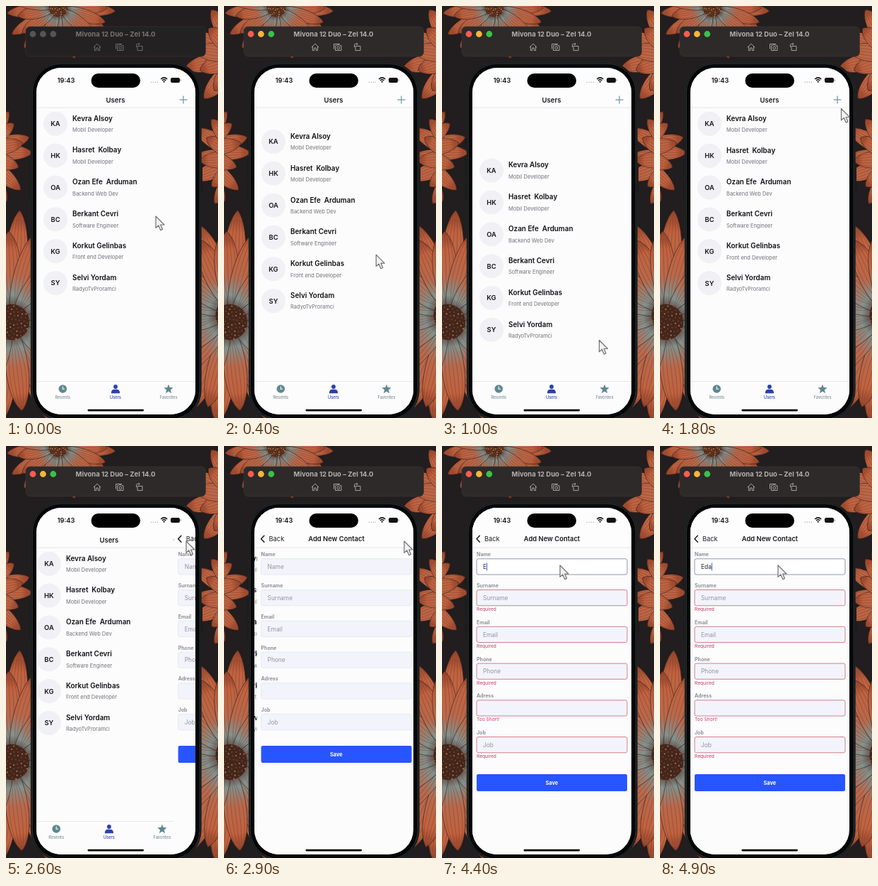
An HTML page that plays this animation: 300 px wide and 580 px high, repeating every 5 s.

```html
<!DOCTYPE html>
<html lang="en">
<head>
<meta charset="utf-8">
<title>Contacts app</title>
<style>
html, body { margin: 0; width: 100%; height: 100%; overflow: hidden; background: #211c1d; }
svg { display: block; width: 300px; height: 580px; }
text { font-family: Inter, Roboto, sans-serif; white-space: pre; }
</style>
</head>
<body>
<svg id="stage" viewBox="0 0 300 580" xmlns="http://www.w3.org/2000/svg"></svg>
<script>
const LOOP = 5000, STEP = 100;
const SCREEN = { x: 43, y: 87, w: 225, h: 488 };
const $ = id => document.getElementById(id);

const text = (x, y, size, str, fill, weight = 400, anchor = "start") =>
  `<text x="${x}" y="${y}" font-size="${size}" font-weight="${weight}" fill="${fill}" text-anchor="${anchor}">${str}</text>`;
const rect = (x, y, w, h, r, fill, extra = "") =>
  `<rect x="${x}" y="${y}" width="${w}" height="${h}" rx="${r}" fill="${fill}" ${extra}/>`;
const circle = (x, y, r, fill, extra = "") =>
  `<circle cx="${x}" cy="${y}" r="${r}" fill="${fill}" ${extra}/>`;
const path = (d, extra) => `<path d="${d}" ${extra}/>`;

// ---- wallpaper ----
function seeded(seed) {
  return () => (seed = (seed * 16807) % 2147483647) / 2147483647;
}

function petal(x, y, angle, len, w) {
  let veins = "";
  for (let k = -.6; k < .7; k += .3)
    veins += `M${len * .15} 0Q${len * .5} ${k * w * 1.5} ${len * .92} ${k * w * .5}`;
  const shape = `M0 0C${len * .25} ${-w} ${len * .85} ${-w} ${len} 0C${len * .85} ${w} ${len * .25} ${w} 0 0Z`;
  return `<g transform="translate(${x} ${y}) rotate(${angle})">` +
    path(shape, 'fill="url(#petal)" stroke="#3d211c" stroke-width=".9" stroke-opacity=".7"') +
    path(veins, 'fill="none" stroke="#6b3022" stroke-width="1" opacity=".35"') + "</g>";
}

// Two rings of petals around a speckled disc
function flower(x, y, radius, count, seed) {
  const random = seeded(seed);
  let out = "";
  for (const ring of [1, .85])
    for (let i = 0; i < count; i++) {
      const angle = (i + ring * 3 + random() * .5) * 360 / count;
      out += petal(x, y, angle, radius * ring * (.88 + random() * .2), radius * 2.3 / count);
    }
  const core = radius * .17;
  out += circle(x, y, core, "#43261c");
  for (let i = 1; i < 70; i++) {
    const a = i * 2.4, d = core * Math.sqrt(i / 70);
    out += circle((x + d * Math.cos(a)).toFixed(1), (y + d * Math.sin(a)).toFixed(1), 1.1, i % 3 ? "#70402a" : "#b8703f");
  }
  return out;
}

const wallpaper = () => rect(0, 0, 300, 580, 0, "#221d1e") +
  flower(-42, 205, 82, 13, 5) + flower(334, 70, 80, 11, 8) + flower(338, 215, 80, 12, 3) +
  flower(74, 2, 78, 15, 11) + flower(322, 435, 150, 16, 21) + flower(8, 445, 148, 16, 14);

// ---- simulator window and phone body ----
function windowBar() {
  const line = 'fill="none" stroke="currentColor" stroke-width=".9" stroke-linejoin="round"';
  return rect(28, 29, 254.5, 42, 6, "#2b2827", 'id="bar" stroke="#3b3735" stroke-width=".6"') +
    lights.map((c, i) => circle(38 + i * 14.4, 39.5, 4.4, c, `id="light${i}"`)).join("") +
    `<g id="barInk">` + text(155, 42.6, 9.5, "Mivona 12 Duo – Zel 14.0", "currentColor", 700, "middle") +
    path("M123.8 58.2L129 53.2L134.2 58.2M125.4 57V62.6H127.7V59H130.3V62.6H132.6V57", line) +
    path("M155.5 60.5V53.5H164M157.5 55.8H159.3L160.2 54.8H163L163.9 55.8H166V62.5H157.5Z", line) +
    circle(161.7, 59, 1.9, "none", 'stroke="currentColor" stroke-width=".9"') +
    path("M186 56.5H193V62.6H186ZM184.5 58V54.5Q184.5 53.5 185.5 53.5H189M187.6 52L189.2 53.5L187.6 55", line) + "</g>";
}

function phoneBody() {
  const button = (x, y, h) => rect(x, y, 3, h, 1, "#15191a");
  return button(33.4, 186, 14) + button(33.4, 215, 25) + button(33.4, 247, 25) + button(275, 222, 42) +
    rect(35.2, 79.3, 241, 504, 42, "#111415", 'stroke="#24292a"') +
    rect(37.3, 81.3, 236.8, 500, 40, "#050607", 'stroke="#353b3d" stroke-width=".9"');
}

function statusBar() {
  let out = text(85, 108, 9.2, "19:43", "#111", 600, "middle") + rect(120.5, 95, 69.5, 20, 10, "#000");
  for (let i = 0; i < 4; i++) out += circle(205.3 + i * 3, 107.2, .7, "#aaa");
  return out +
    path("M219.2 103Q223.7 98.8 228.2 103M221 105Q223.7 102.5 226.4 105", 'fill="none" stroke="#111" stroke-width="1.5"') +
    path("M222.1 106.3Q223.7 105 225.3 106.3L223.7 108Z", 'fill="#111"') +
    rect(233, 101, 13, 7, 2.2, "#111") + rect(246.6, 103.2, 1, 2.6, .5, "#777");
}

// ---- app pages ----
const people = [
  ["KA", "Kevra Alsoy", "Mobil Developer"],
  ["HK", "Hasret  Kolbay", "Mobil Developer"],
  ["OA", "Ozan Efe  Arduman", "Backend Web Dev"],
  ["BC", "Berkant Cevri", "Software Engineer"],
  ["KG", "Korkut Gelinbas", "Front end Developer"],
  ["SY", "Selvi Yordam", "RadyoTvProramci"]
];

const header = rect(43, 87, 225, 56, 0, "#fdfdfe") + rect(43, 142.7, 225, .7, 0, "#d9dadd");

function starPath(cx, cy, r) {
  let d = "";
  for (let i = 0; i < 10; i++) {
    const a = i * Math.PI / 5 - Math.PI / 2, k = i % 2 ? r * .42 : r;
    d += (i ? "L" : "M") + (cx + k * Math.cos(a)).toFixed(2) + " " + (cy + k * Math.sin(a)).toFixed(2);
  }
  return d + "Z";
}

function listPage() {
  const rows = people.map(([initials, name, job], i) => {
    const y = i * 44.85;
    return circle(70, 165.7 + y, 17, "#f0f0f5") +
      text(70, 169.2 + y, 9.4, initials, "#17171a", 600, "middle") +
      text(94, 161.6 + y, 9.9, name, "#101014", 600) +
      text(94, 177 + y, 7.5, job, "#727278");
  }).join("");
  const teal = "#5f8790", blue = "#2b40ad";
  const tab = (x, label, fill) => text(x, 552.8, 5.7, label, fill, 500, "middle");
  return rect(43, 87, 225, 488, 0, "#fcfcfd") + `<g id="rows">${rows}</g>` + header +
    text(155, 135.6, 9.5, "Users", "#17171a", 600, "middle") +
    path("M251 126.5V137.5M245.5 132H256.5", 'stroke="#83a8ae" stroke-width="1.5"') +
    rect(43, 528, 225, 47, 0, "#fcfcfd") + rect(43, 528, 225, .7, 0, "#dedfe2") +
    circle(80.3, 539, 5.8, teal) + path("M80.3 535.4V539.2H83.2", 'fill="none" stroke="#fff" stroke-width="1.1"') +
    circle(155, 536, 2.9, blue) + path("M149 545.3V543.6Q149.6 539.8 153 539.8H157Q160.4 539.8 161 543.6V545.3Z", `fill="${blue}"`) +
    path(starPath(230, 539.5, 7), `fill="${teal}"`) +
    tab(80.3, "Resents", "#7d8f96") + tab(155, "Users", blue) + tab(230, "Favorites", "#7d8f96");
}

const fields = [
  ["Name"], ["Surname", "Required"], ["Email", "Required"],
  ["Phone", "Required"], ["Adress", "Too Short!"], ["Job", "Required"]
];

function formPage() {
  const rows = fields.map(([label, error], i) =>
    `<g id="field${i}">` + text(49, 155.4, 7.1, label, "#83838d", 600) +
    rect(49, 158.8, 213, 22.2, 2.5, "#f3f4fb", `id="box${i}" stroke="#e3e5ee" stroke-width=".8"`) +
    `<g id="hint${i}">` + (label === "Adress" ? "" : text(58, 173.1, 8.4, label, "#92939e")) + "</g>" +
    (error ? `<g class="error">${text(49, 188.3, 6.6, error, "#c03a62")}</g>` : "") + "</g>").join("");
  return rect(43, 87, 225, 488, 0, "#fcfcfd") + header +
    path("M53.3 126.2L49 130.7L53.3 135.2", 'fill="none" stroke="#17171a" stroke-width="1.5" stroke-linecap="round" stroke-linejoin="round"') +
    text(60, 134.2, 9.3, "Back", "#222226") +
    text(155.5, 134.2, 9.4, "Add New Contact", "#17171a", 600, "middle") + rows +
    `<text id="typed" x="58" y="173.1" font-size="8.4" fill="#222228"></text>` +
    rect(58, 164.3, 1, 11.2, .5, "#3f62e8", 'id="caret"') +
    `<g id="save">` + rect(49, 422, 213, 24, 2.2, "#2755ff") + text(155.3, 436.8, 7.4, "Save", "#fff", 700, "middle") + "</g>";
}

const lights = ["#ff5b50", "#f9b53a", "#38c249"];

$("stage").innerHTML = `<defs>
  <linearGradient id="petal"><stop offset=".1" stop-color="#4d2a22"/><stop offset=".28" stop-color="#82928e"/>
    <stop offset=".5" stop-color="#b8694c"/><stop offset=".8" stop-color="#c06340"/><stop offset="1" stop-color="#8f4029"/></linearGradient>
  <clipPath id="screen">${rect(SCREEN.x, SCREEN.y, SCREEN.w, SCREEN.h, 35, "#fff")}</clipPath></defs>` +
  wallpaper() + phoneBody() + windowBar() +
  `<g clip-path="url(#screen)"><g id="list">${listPage()}</g><g id="form">${formPage()}</g>${statusBar()}` +
  rect(115.5, 567.8, 79.5, 2.6, 1.3, "#000") + "</g>" +
  `<g id="cursor">` + path("M0 0V16.4L3.8 13L6.7 19.6L9.5 18.4L6.7 12H12Z",
    'fill="#f1f1f1" stroke="#707074" stroke-width="1.2" stroke-linejoin="round"') + "</g>";

// ---- motion ----
const GRAB = 100, RELEASE = 940, PUSH = 2565, FOCUS = 3600;
const TYPE = 4400, KEY_GAP = 220, WORD = "Eda";
const home = { x: 212, y: 296 };
const legs = [
  { from: GRAB, to: 910, x: 222.5, y: 470.5 },
  { from: 1100, to: 1750, x: 256.5, y: 144.5 },
  { from: 1850, to: 2250, x: 255, y: 134 },
  { from: 3000, to: 3550, x: 167, y: 168 }
];

const clamp = p => Math.min(1, Math.max(0, p));
const ease = p => p * p * (3 - 2 * p);

// Share of the way still to go for a critically damped spring
function springLeft(ms, omega) {
  const s = omega * Math.max(0, ms) / 1000;
  return s > 10 ? 0 : (1 + s) * Math.exp(-s);
}

function pointer(t) {
  let { x, y } = home;
  for (const leg of legs) {
    const p = ease(clamp((t - leg.from) / (leg.to - leg.from)));
    x += (leg.x - x) * p;
    y += (leg.y - y) * p;
  }
  return { x, y };
}

// The list follows the drag with scroll resistance, then springs back
function pull(t) {
  const slop = 5, height = 385;
  const drag = .55 * Math.max(0, pointer(Math.min(t, RELEASE)).y - home.y - slop);
  return drag * height / (height + drag) * springLeft(t - RELEASE, 10);
}

const move = (id, x, y) => $(id).setAttribute("transform", `translate(${x.toFixed(2)} ${y.toFixed(2)})`);
const set = (id, attrs) => { for (const k in attrs) $(id).setAttribute(k, attrs[k]); };
const show = (el, on) => { el.style.display = on ? "" : "none"; };

function draw(t) {
  const active = t >= GRAB;
  set("bar", { fill: active ? "#2d2a29" : "#242122" });
  set("barInk", { color: active ? "#b3b0ae" : "#777472" });
  lights.forEach((c, i) => set("light" + i, { fill: active ? c : "#575454" }));

  const { x, y } = pointer(t);
  move("cursor", x, y);
  move("rows", 0, pull(t));

  const left = springLeft(t - PUSH, 18.26);
  move("list", -.3 * SCREEN.w * (1 - left), 0);
  move("form", SCREEN.w * left, 0);
  show($("form"), left < 1);

  const count = Math.min(WORD.length, Math.max(0, Math.floor((t - TYPE) / KEY_GAP) + 1));
  const focused = t >= FOCUS, invalid = count > 0;
  fields.forEach(([, error], i) => {
    move("field" + i, 0, i * 43.75 + (invalid ? Math.max(0, i - 1) * 8 : 0));
    if (error) set("box" + i, { stroke: invalid ? "#c9606c" : "#e3e5ee" });
  });
  document.querySelectorAll(".error").forEach(el => show(el, invalid));
  set("box0", { fill: focused ? "#fff" : "#f3f4fb", stroke: focused ? "#747b9f" : "#e3e5ee" });
  move("save", 0, invalid ? 40 : 0);

  const typed = $("typed");
  typed.textContent = WORD.slice(0, count);
  show($("hint0"), !count);
  show($("caret"), focused);
  set("caret", { x: 58 + (count ? typed.getComputedTextLength() : 0) });
}

const start = performance.now();
function tick() {
  const t = (performance.now() - start) % LOOP;
  draw(Math.floor(t / STEP) * STEP);
  requestAnimationFrame(tick);
}
draw(0);
requestAnimationFrame(tick);
</script>
</body>
</html>
```
